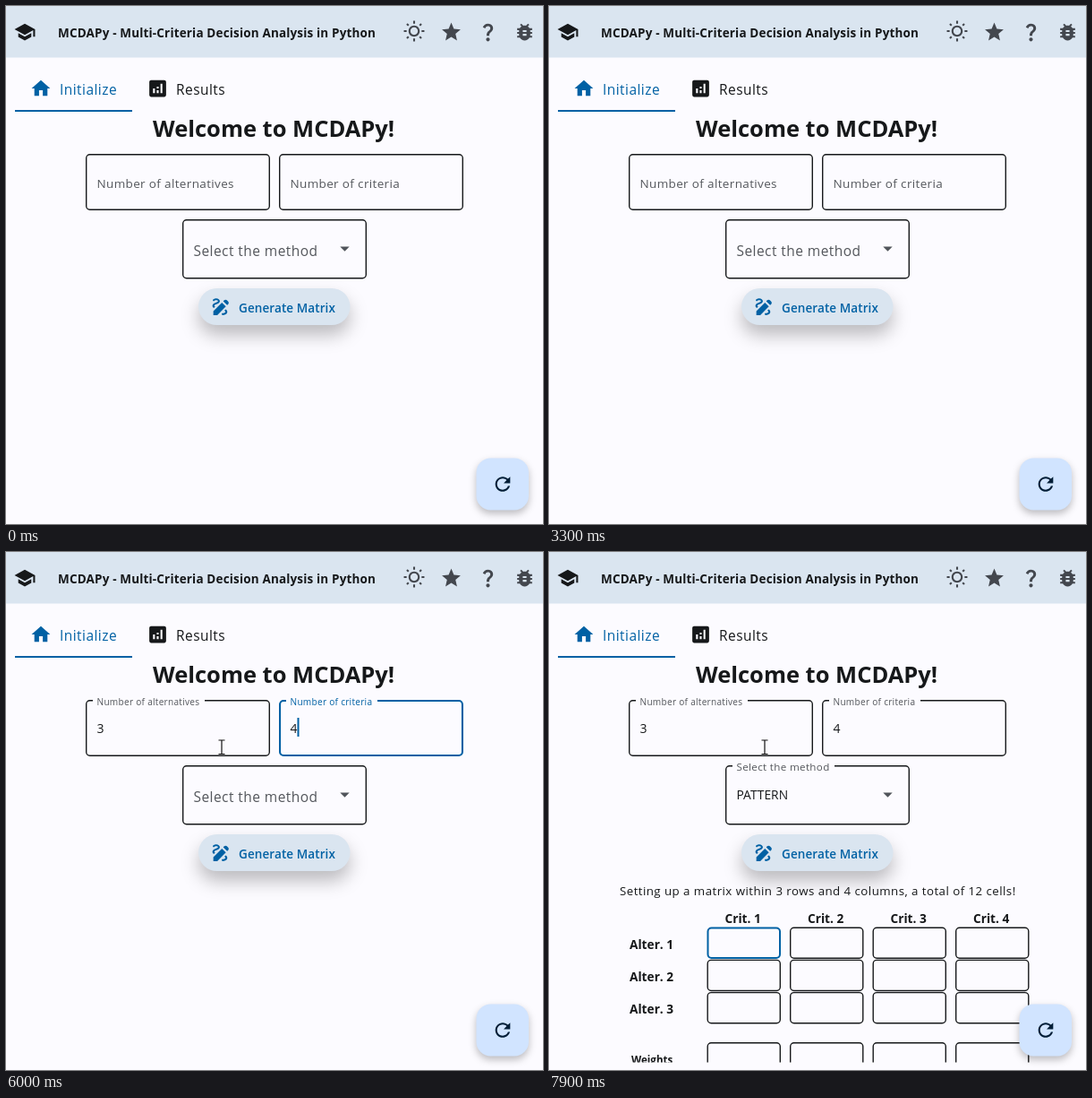
Animation of 600 by 578 pixels, one loop 8000 ms. Source, as an HTML page with a canvas:

```html
<!DOCTYPE html>
<html lang="en">
<head>
<meta charset="utf-8">
<title>MCDAPy</title>
<style>
html, body { margin: 0; width: 100%; height: 100%; overflow: hidden; background: #fcfbff; }
canvas { display: block; width: 600px; height: 578px; }
</style>
</head>
<body>
<canvas id="stage"></canvas>
<script>
const W = 600, H = 578, LOOP = 8000;
const canvas = document.getElementById('stage');
const ctx = canvas.getContext('2d');
const ratio = window.devicePixelRatio || 1;
canvas.width = W * ratio;
canvas.height = H * ratio;

const INK = '#16181a', GREY = '#54575c', BLUE = '#0061a4', BAR = '#dae5f0', PAPER = '#fcfbff';

// Moments of the interaction, in ms
const T = { first: 4500, three: 5400, second: 5600, four: 5850, method: 6250,
            pick: 6600, button: 6800, matrix: 7350 };

const icons = {
  school: 'M5 13.18v4L12 21l7-3.82v-4L12 17l-7-3.82zM12 3L1 9l11 6 9-4.91V17h2V9L12 3z',
  sun: 'M6.76 4.84l-1.8-1.79-1.41 1.41 1.79 1.79 1.42-1.41zM4 10.5H1v2h3v-2zm9-9.95h-2V3.5h2V.55zm7.45 3.91l-1.41-1.41-1.79 1.79 1.41 1.41 1.79-1.79zm-3.21 13.7l1.79 1.8 1.41-1.41-1.8-1.79-1.4 1.4zM20 10.5v2h3v-2h-3zm-8-5c-3.31 0-6 2.69-6 6s2.69 6 6 6 6-2.69 6-6-2.69-6-6-6zm0 10c-2.21 0-4-1.79-4-4s1.79-4 4-4 4 1.79 4 4-1.79 4-4 4zm-1 6.95h2V19.5h-2v2.95zm-7.45-3.91l1.41 1.41 1.79-1.8-1.41-1.41-1.79 1.8z',
  star: 'M12 17.27L18.18 21l-1.64-7.03L22 9.24l-7.19-.61L12 2 9.19 8.63 2 9.24l5.46 4.73L5.82 21z',
  help: 'M11.07 12.85c.77-1.39 2.25-2.21 3.11-3.44.91-1.29.4-3.7-2.18-3.7-1.69 0-2.52 1.28-2.87 2.34L6.54 6.96C7.25 4.83 9.18 3 11.99 3c2.35 0 3.96 1.07 4.78 2.41.7 1.15 1.11 3.3.03 4.9-1.2 1.77-2.35 2.31-2.97 3.45-.25.46-.35.76-.35 2.24h-2.89c-.01-.78-.13-2.05.48-3.15zM14 20c0 1.1-.9 2-2 2s-2-.9-2-2 .9-2 2-2 2 .9 2 2z',
  bug: 'M20 8h-2.81c-.45-.78-1.07-1.45-1.82-1.96L17 4.41 15.59 3l-2.17 2.17C12.96 5.06 12.49 5 12 5c-.49 0-.96.06-1.41.17L8.41 3 7 4.41l1.62 1.63C7.88 6.55 7.26 7.22 6.81 8H4v2h2.09c-.05.33-.09.66-.09 1v1H4v2h2v1c0 .34.04.67.09 1H4v2h2.81c1.04 1.79 2.97 3 5.19 3s4.15-1.21 5.19-3H20v-2h-2.09c.05-.33.09-.66.09-1v-1h2v-2h-2v-1c0-.34-.04-.67-.09-1H20V8zm-6 8h-4v-2h4v2zm0-4h-4v-2h4v2z',
  home: 'M10 20v-6h4v6h5v-8h3L12 3 2 12h3v8z',
  chart: 'M19 3H5c-1.1 0-2 .9-2 2v14c0 1.1.9 2 2 2h14c1.1 0 2-.9 2-2V5c0-1.1-.9-2-2-2zM9 17H7v-5h2v5zm4 0h-2v-3h2v3zm0-5h-2v-2h2v2zm4 5h-2V7h2v10z',
  draw: 'M18.85 10.39l1.06-1.06c.78-.78.78-2.05 0-2.83L18.5 5.09c-.78-.78-2.05-.78-2.83 0l-1.06 1.06 4.24 4.24zm-5.66-2.83L4 16.76V21h4.24l9.19-9.19-4.24-4.25zM19 17.5c0 2.19-2.54 3.5-5 3.5-.55 0-1-.45-1-1s.45-1 1-1c1.54 0 3-.73 3-1.5 0-.47-.48-.87-1.23-1.2l1.48-1.48c1.07.63 1.75 1.47 1.75 2.68zM4.58 13.35C3.61 12.79 3 12.06 3 11c0-1.8 1.89-2.63 3.56-3.36C7.59 7.18 9 6.56 9 6c0-.41-.78-1-2-1-1.26 0-1.8.61-1.83.64-.35.41-.98.46-1.4.12-.41-.34-.49-.95-.15-1.38C3.73 4.24 4.76 3 7 3s4 1.32 4 3c0 1.87-1.93 2.72-3.64 3.47C6.42 9.88 5 10.5 5 11c0 .31.43.6 1.07.86l-1.49 1.49z',
  reload: 'M17.65 6.35C16.2 4.9 14.21 4 12 4c-4.42 0-7.99 3.58-7.99 8s3.57 8 7.99 8c3.73 0 6.84-2.55 7.73-6h-2.08c-.82 2.33-3.04 4-5.65 4-3.31 0-6-2.69-6-6s2.69-6 6-6c1.66 0 3.14.69 4.22 1.78L13 11h7V4l-2.35 2.35z',
  drop: 'M7 10l5 5 5-5z'
};
for (const name in icons) icons[name] = new Path2D(icons[name]);

const clamp = v => Math.max(0, Math.min(1, v));
const ease = v => v * v * (3 - 2 * v);
const ramp = (t, start, span) => ease(clamp((t - start) / span));
const lerp = (a, b, k) => a + (b - a) * k;

function mix(a, b, k) {
  const part = (s, i) => parseInt(s.slice(i, i + 2), 16);
  return 'rgb(' + [1, 3, 5].map(i => Math.round(lerp(part(a, i), part(b, i), k))) + ')';
}

function icon(name, cx, cy, color, size = 25) {
  ctx.save();
  ctx.translate(cx - size / 2, cy - size / 2);
  ctx.scale(size / 24, size / 24);
  ctx.fillStyle = color;
  ctx.fill(icons[name]);
  ctx.restore();
}

function text(str, x, y, size, color = INK, weight = 400, gap = 0) {
  ctx.font = `${weight} ${size}px "Open Sans", "Noto Sans", sans-serif`;
  ctx.letterSpacing = gap + 'px';
  ctx.fillStyle = color;
  ctx.fillText(str, x, y);
}

function box(x, y, w, h, r) {
  ctx.beginPath();
  ctx.roundRect(x, y, w, h, r);
}

function raised(x, y, w, h, r, color, blur, drop, alpha) {
  ctx.save();
  ctx.shadowColor = `rgba(0,0,0,${alpha})`;
  ctx.shadowBlur = blur * ratio;
  ctx.shadowOffsetY = drop * ratio;
  ctx.fillStyle = color;
  box(x, y, w, h, r);
  ctx.fill();
  ctx.restore();
}

function outline(x, y, w, h, color, width) {
  ctx.strokeStyle = color;
  ctx.lineWidth = width;
  box(x + width / 2, y + width / 2, w - width, h - width, 4);
  ctx.stroke();
}

// Outlined input whose label floats into the border
function field(f, t) {
  const float = ramp(t, f.focus, 170);
  const lit = float * (1 - ramp(t, f.blur, 170));
  outline(f.x, f.y, f.w, f.h, mix(INK, BLUE, lit), lerp(1.4, 2.1, Math.sqrt(lit)));
  if (float > 0) {
    ctx.fillStyle = PAPER;
    ctx.fillRect(f.x + 8, f.y - 1, f.notch * float, 5);
  }
  text(f.label, f.x + 12.5, lerp(f.base, f.y + 5.5, float), f.size * lerp(1, 0.75, float),
       mix(GREY, BLUE, lit), 400, f.gap * lerp(1, 0.75, float));
  if (t >= f.typed) text(f.value, f.x + 12.5, f.valueBase, f.valueSize);
  if (f.caret && t >= f.focus && t < f.blur) {
    const since = t - (t >= f.typed ? f.typed : f.focus);
    if (since % 1000 < 500) {
      ctx.fillStyle = BLUE;
      ctx.fillRect(f.x + (t >= f.typed ? 20.5 : 12), f.y + 20, 2, 21);
    }
  }
}

const input = { y: 165, w: 206, h: 63, base: 203, size: 13.5, gap: 0.35, valueBase: 202, valueSize: 14, caret: true };
const fields = [
  { ...input, x: 89, label: 'Number of alternatives', notch: 125, value: '3',
    focus: T.first, typed: T.three, blur: T.second },
  { ...input, x: 305, label: 'Number of criteria', notch: 102, value: '4',
    focus: T.second, typed: T.four, blur: T.method },
  { x: 197, y: 238, w: 206, h: 66.5, base: 278.5, size: 15.5, gap: 0.45, label: 'Select the method',
    notch: 114, value: 'PATTERN', valueBase: 276, valueSize: 13.8,
    focus: T.method, typed: T.pick, blur: T.button }
];

function header() {
  ctx.fillStyle = BAR;
  ctx.fillRect(0, 0, W, 57.5);
  icon('school', 21, 29, INK);
  text('MCDAPy - Multi-Criteria Decision Analysis in Python', 58, 35, 13.5, INK, 700, 0.16);
  icon('sun', 456, 28.5, '#43474e');
  icon('star', 497.5, 29, '#43474e');
  icon('help', 538.5, 29, '#43474e');
  icon('bug', 579.5, 29, '#43474e');
}

function tabs() {
  icon('home', 39, 92, BLUE);
  text('Initialize', 60, 99, 15.5, BLUE, 400, 0.45);
  icon('chart', 169.5, 92, INK);
  text('Results', 190, 99, 15.5, INK, 400, 0.45);
  ctx.fillStyle = BLUE;
  ctx.fillRect(10, 116, 131, 2);
}

function matrix() {
  text('Setting up a matrix within 3 rows and 4 columns, a total of 12 cells!', 79, 383, 13.3, INK, 400, 0.45);
  ctx.save();
  ctx.beginPath();
  ctx.rect(0, 390, W, 179.5);
  ctx.clip();
  for (let c = 0; c < 4; c++) {
    const x = 176.5 + c * 92.5;
    text('Crit. ' + (c + 1), x + 20, 413.5, 13.7, INK, 700);
    for (let r = 0; r < 4; r++) {
      const y = r < 3 ? 418.5 + r * 36.2 : 547;
      const lit = !c && !r;
      outline(x, y, 82.5, 35.5, lit ? BLUE : INK, lit ? 2 : 1.4);
    }
  }
  for (let r = 0; r < 3; r++) text('Alter. ' + (r + 1), 90, 442.5 + r * 36.2, 13.7, INK, 700);
  text('Weights', 92, 570.5, 11.6, INK, 700);
  ctx.restore();
}

function beam(x, y) {
  ctx.strokeStyle = '#111';
  ctx.lineWidth = 1.2;
  ctx.beginPath();
  ctx.moveTo(x, y + 1);
  ctx.lineTo(x, y + 16);
  for (const edge of [y + 0.5, y + 16]) {
    ctx.moveTo(x - 3.5, edge);
    ctx.lineTo(x + 3.5, edge);
  }
  ctx.stroke();
}

function draw(t) {
  ctx.setTransform(ratio, 0, 0, ratio, 0, 0);
  ctx.fillStyle = PAPER;
  ctx.fillRect(0, 0, W, H);
  header();
  tabs();
  text('Welcome to MCDAPy!', 164, 146, 25.5, INK, 700);
  fields.forEach(f => field(f, t));
  icon('drop', 378.5, 270.5, '#50545a');

  const held = ramp(t, T.button, 60) * (1 - ramp(t, T.matrix, 100));
  raised(215, 315, 169.5, 41, 20.5, mix(BAR, '#bfd5e7', held), 20, 11, 0.26);
  icon('draw', 240, 335.5, BLUE);
  text('Generate Matrix', 260, 341.5, 13.5, BLUE, 600, 0.1);

  if (t >= T.matrix) matrix();
  raised(525.5, 504.5, 58.5, 58, 16, '#d1e4ff', 9, 4, 0.26);
  icon('reload', 555, 533.5, '#001d36');
  if (t >= T.first - 100) beam(241, 209.5);
}

const start = performance.now();
function frame(now) {
  draw(Math.max(0, now - start) % LOOP);
  requestAnimationFrame(frame);
}
draw(0);
requestAnimationFrame(frame);
</script>
</body>
</html>
```
